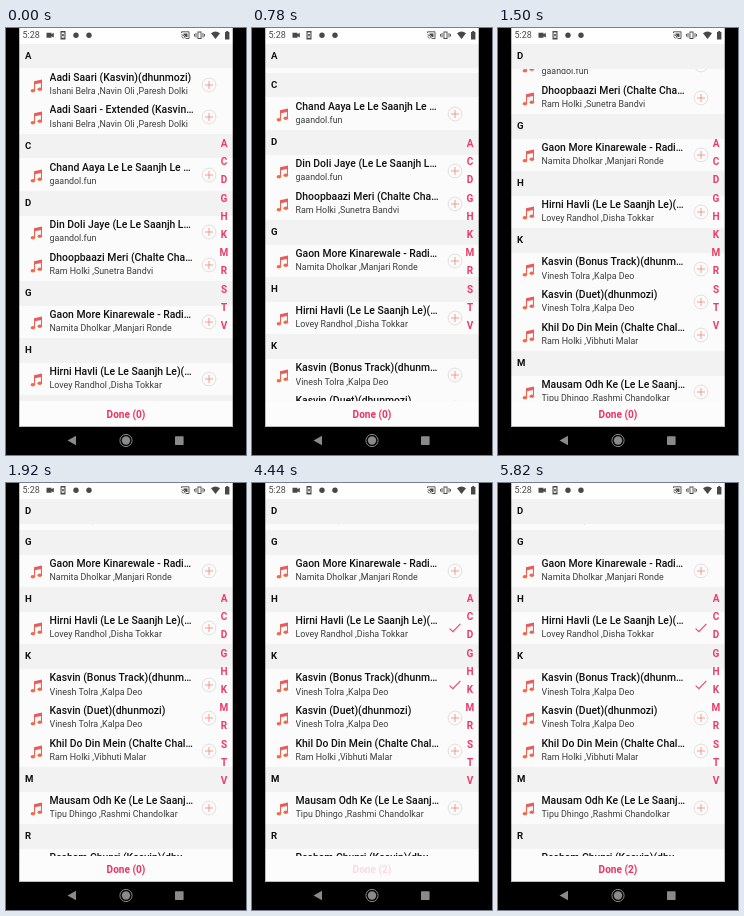
These frames come from a looping animation (240x427 px, 6060 ms). An HTML page:

```html
<!DOCTYPE html>
<html lang="en">
<head>
<meta charset="utf-8">
<title>Song picker</title>
<style>
  html, body { margin: 0; width: 100%; height: 100%; overflow: hidden; background: #000; }
  body { position: relative; font-family: Roboto, sans-serif; color: #111; }
  .screen { position: absolute; left: 13px; top: 0; width: 214px; height: 399px; background: #fbfbfb; overflow: hidden; }
  .edge { position: absolute; inset: 0; border: solid rgba(0, 0, 0, .25); border-width: 0 1px 1px; }
  .status { position: absolute; left: 0; top: 0; width: 214px; height: 15.7px; background: #fefefe; }
  .status span { position: absolute; left: 3.5px; top: 2px; font-size: 9px; line-height: 11px; color: #484848; }
  .list { position: absolute; left: 0; top: 15.7px; width: 214px; height: 357.8px; overflow: hidden; isolation: isolate; }
  .head { position: sticky; top: 0; z-index: 1; height: 24.6px; padding-left: 6px; background: #f2f2f2; font: 700 9.6px/24.6px Roboto, sans-serif; }
  .row { position: relative; height: 32.7px; }
  .title, .artist { position: absolute; left: 30.5px; width: 145.5px; white-space: nowrap; overflow: hidden; }
  .title { top: 3.4px; font: 500 10.4px/12px Roboto, sans-serif; text-overflow: ellipsis; }
  .artist { top: 17.7px; font-size: 8.9px; line-height: 11px; color: #3c3c3c; }
  .note { position: absolute; left: 11px; top: 10.3px; width: 13px; height: 14px; }
  .mark { position: absolute; left: 182px; top: 8.3px; width: 16px; height: 16px; }
  .pad { height: 120px; }
  .index { position: absolute; left: 198px; top: 107px; width: 14px; text-align: center; color: #ee3a67; font: 700 10px/18.2px Roboto, sans-serif; }
  .done { position: absolute; left: 0; top: 373.5px; width: 214px; height: 25.5px; background: #fcfcfc; color: #f0325f; text-align: center; font: 700 10.1px/26px Roboto, sans-serif; }
  .dim { position: absolute; inset: 0; background: #000; opacity: 0; }
  .bars { position: absolute; left: 0; top: 0; width: 240px; height: 427px; }
</style>
</head>
<body>
<svg width="0" height="0" style="position:absolute">
  <defs>
    <linearGradient id="warm" x1="0" y1="0" x2="0" y2="14" gradientUnits="userSpaceOnUse">
      <stop offset="0" stop-color="#e9565f"/><stop offset="1" stop-color="#f0704a"/>
    </linearGradient>
    <g id="note" fill="url(#warm)">
      <path d="M4 2.2 12 .5V10.3H10.9V4L5.1 5.2V12H4Z"/>
      <ellipse cx="2.9" cy="11.7" rx="2.3" ry="1.8"/><ellipse cx="9.8" cy="10.2" rx="2.3" ry="1.8"/>
    </g>
    <g id="plus" fill="none">
      <circle cx="8" cy="8" r="6.9" stroke="#dcd8d6" stroke-width=".8"/>
      <path d="M4 8H12M8 4V12" stroke="#ee8a78" stroke-width=".8"/>
    </g>
    <path id="check" d="M2.6 8.6 5.9 11.7 13.4 3.9" fill="none" stroke="#ea4a6c" stroke-width="1.2"/>
  </defs>
</svg>

<div class="screen">
  <div class="list" id="list"></div>
  <div class="status"><span>5:28</span></div>
  <div class="index" id="index"></div>
  <div class="done"><span id="done"></span></div>
  <div class="edge"></div>
</div>

<svg class="bars" viewBox="0 0 240 427">
  <g fill="#484848">
    <path d="M40.5 4.7H45.5V6.2L47.8 4.8V9.6L45.5 8.2V9.7H40.5Z"/>
    <path d="M54.5 3H59.5V11.5H54.5ZM55.6 4.6V9.8H58.4V4.6Z" fill-rule="evenodd"/>
    <path d="M56.2 6H57.8V8.3H56.2Z"/>
    <circle cx="70" cy="7.2" r="2.7"/><circle cx="83" cy="7.2" r="2.7"/>
    <path d="M205 5.3Q209.5 1.9 214 5.3L209.5 11Z"/>
    <path d="M219 4H220.2V3H222.2V4H223.4V11.5H219Z"/>
    <path d="M191.5 3.5H195.5V11H191.5ZM192.4 4.6V9.9H194.6V4.6Z" fill-rule="evenodd"/>
    <path d="M177.5 5.4H181.5V9H179.8Q179.2 7 177.5 6.4Z"/>
  </g>
  <g fill="none" stroke="#484848" stroke-width=".9">
    <path d="M175.5 5V3.8H183V10.5H180M175.5 6.7A4 4 0 0 1 179.3 10.5M175.5 8.7A2 2 0 0 1 177.3 10.5"/>
    <path d="M190 5V9.5M188.5 6V8.5M197 5V9.5M198.5 6V8.5"/>
  </g>
  <g fill="#8a8a8a">
    <path d="M61.5 412.5 70 407.8V417.2Z"/>
    <circle cx="120" cy="412.5" r="4.2"/>
    <circle cx="120" cy="412.5" r="6.1" fill="none" stroke="#8a8a8a"/>
    <rect x="169" y="408.3" width="8.6" height="8.6" rx=".6"/>
  </g>
</svg>
<div class="dim" id="dim"></div>

<script>
const LOOP = 6060, STEP = 60;
const film = '(Le Le Saanjh Le)', site = '(dhunmozi)';
const duo = 'Vinesh Tolra ,Kalpa Deo';
const trio = 'Ishani Belra ,Navin Oli ,Paresh Dolki';
const sections = [
  ['A', ['Aadi Saari (Kasvin)' + site, trio],
        ['Aadi Saari - Extended (Kasvin)' + site, trio]],
  ['C', ['Chand Aaya Le Le Saanjh Le Unplugged', 'gaandol.fun']],
  ['D', ['Din Doli Jaye ' + film + site, 'gaandol.fun'],
        ['Dhoopbaazi Meri (Chalte Chalaate)', 'Ram Holki ,Sunetra Bandvi']],
  ['G', ['Gaon More Kinarewale - Radio Edit', 'Namita Dholkar ,Manjari Ronde']],
  ['H', ['Hirni Havli ' + film + site, 'Lovey Randhol ,Disha Tokkar']],
  ['K', ['Kasvin (Bonus Track)' + site, duo],
        ['Kasvin (Duet)' + site, duo],
        ['Khil Do Din Mein (Chalte Chalaate)', 'Ram Holki ,Vibhuti Malar']],
  ['M', ['Mausam Odh Ke ' + film + site, 'Tipu Dhingo ,Rashmi Chandolkar']],
  ['R', ['Resham Chunri (Kasvin)' + site, duo]]
];

// [time in ms, value], linear in between
const scroll = [[0, 0], [120, 4], [240, 11], [480, 29.5], [720, 54], [1020, 91], [1320, 137], [1380, 137],
  [1440, 156], [1500, 167.3], [1620, 185], [1740, 197], [1860, 204.5], [1920, 206]];
const dimming = [[4560, 0], [4860, .5], [5640, .5], [5820, 0]];
const donePress = [[4380, 1], [4440, .17], [4620, .17], [4860, 1]];
const picks = [
  { row: 'H0', checked: 2820, fade: [[2640, 1], [2700, .3], [2820, .4], [2940, 1]] },
  { row: 'K0', checked: 3720, fade: [[3600, 1], [3660, .3], [3780, 1]] }
];

const $ = id => document.getElementById(id);
const icon = (cls, id, box) => `<svg class="${cls}" viewBox="0 0 ${box}"><use href="#${id}"/></svg>`;
const rowHtml = (key, [title, artist]) => `<div class="row" id="${key}">${icon('note', 'note', '13 14')}
  <div class="title">${title}</div><div class="artist">${artist}</div>${icon('mark', 'plus', '16 16')}</div>`;

$('list').innerHTML = sections.map(([letter, ...rows]) =>
  `<section><div class="head">${letter}</div>${rows.map((r, i) => rowHtml(letter + i, r)).join('')}</section>`
).join('') + '<div class="pad"></div>';
$('index').innerHTML = [...'ACDGHKMRSTV'].map(c => `<div>${c}</div>`).join('');
for (const pick of picks) pick.mark = $(pick.row).querySelector('.mark');

function valueAt(track, t) {
  const next = track.findIndex(([time]) => time > t);
  if (next < 0) return track[track.length - 1][1];
  if (next === 0) return track[0][1];
  const [t0, a] = track[next - 1], [t1, b] = track[next];
  return a + (b - a) * (t - t0) / (t1 - t0);
}

function render(t) {
  $('list').scrollTop = valueAt(scroll, t);
  for (const { mark, checked, fade } of picks) {
    mark.firstElementChild.setAttribute('href', t >= checked ? '#check' : '#plus');
    mark.style.opacity = valueAt(fade, t);
  }
  $('done').textContent = `Done (${picks.filter(p => t >= p.checked).length})`;
  $('done').style.opacity = valueAt(donePress, t);
  $('dim').style.opacity = valueAt(dimming, t);
}

const start = performance.now();
function tick() {
  const t = (performance.now() - start) % LOOP;
  render(Math.floor(t / STEP) * STEP);
  requestAnimationFrame(tick);
}
tick();
</script>
</body>
</html>
```
